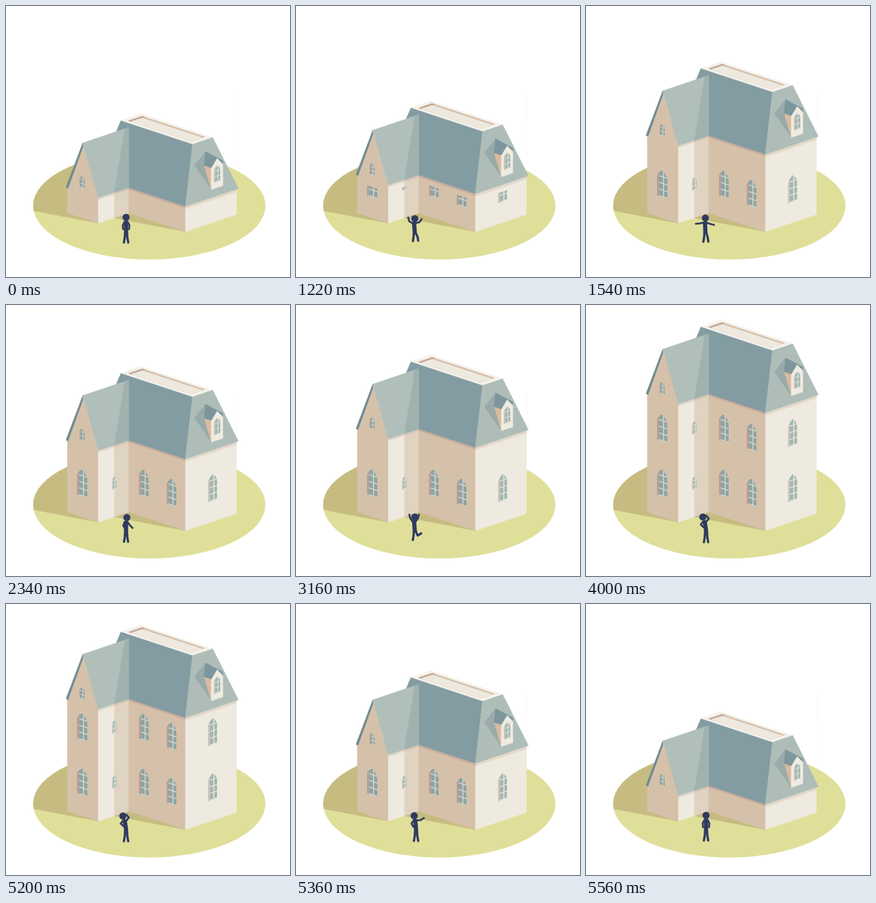
Animation of 440 by 418 pixels, one loop 6 s. Source, as an HTML page with a canvas:

```html
<!DOCTYPE html>
<html lang="en">
<head>
<meta charset="utf-8">
<title>Growing house</title>
<style>
html, body { margin: 0; width: 100%; height: 100%; overflow: hidden; background: #fff; }
canvas { display: block; }
</style>
</head>
<body>
<canvas id="stage" width="440" height="418"></canvas>
<script>
const ctx = document.getElementById('stage').getContext('2d');
const LOOP = 6000, FLOOR = 71.5, GROW = [1060, 3000], SHRINK = 5200;
const FRONT = .327, SIDE = -.335;                 // screen slopes of the two ground axes
const WING = -47, INNER = -88, LEFT = -136, RIGHT = 79;
const EAVE = 39, RIDGE = 116, TOP = 123;

const clamp = u => Math.max(0, Math.min(1, u));
const mix = (a, b, u) => a + (b - a) * u;
const ramp = (t, a, b) => { const u = clamp((t - a) / (b - a)); return u * u * (3 - 2 * u); };
const pulse = (t, a, b, c, d) => ramp(t, a, b) - ramp(t, c, d);
const cubic = u => u < .5 ? 4 * u ** 3 : 1 - 4 * (1 - u) ** 3;

// Shoot up to a peak, then settle on the new floor height.
const rise = (t, from, peak, rest) =>
  mix(mix(from, peak, cubic(clamp(t / 415))), rest, ramp(t, 415, 600));

function roofLift(t) {
  if (t < GROW[1]) return rise(t - GROW[0], 0, 84, FLOOR);
  if (t < SHRINK) return rise(t - GROW[1], FLOOR, 147, 2 * FLOOR);
  const u = clamp((t - SHRINK + 40) / 400);
  return 2 * FLOOR * (1 - ramp(u, 0, 1) - .43 * u * (1 - u) ** 2);
}

// u runs along the front wall, v along the right wall, z up; origin at the near corner.
const project = ([u, v, z]) => [278 + u + v, 348 + FRONT * u + SIDE * v - z];

function trace(points) {
  ctx.beginPath();
  for (const p of points) ctx.lineTo(...p);
}

function fill(color, points) {
  trace(points);
  ctx.closePath();
  ctx.fillStyle = ctx.strokeStyle = color;
  ctx.lineWidth = .5;
  ctx.fill();
  ctx.stroke();
}

const face = (color, ...corners) => fill(color, corners.map(project));
const wall = (color, u0, v0, u1, v1, lo, hi) =>
  face(color, [u0, v0, lo], [u0, v0, hi], [u1, v1, hi], [u1, v1, lo]);
const level = (color, u0, u1, v0, v1, z) =>
  face(color, [u0, v0, z], [u0, v1, z], [u1, v1, z], [u1, v0, z]);

const shaded = { slope: FRONT, bar: '#d4d2c6', glass: '#8da4a4', recess: '#ba9f92' };
const sunny = { slope: SIDE, bar: '#e4e3d8', glass: '#a3b7b2', recess: '#cfc5b8' };

function lancet(at, w, h, look) {
  const l = -w / 2, top = -h / 2, spring = top + h * .28, large = w > 10;
  const bar = large ? 1.7 : 1.2, rows = large ? 4 : 3;
  ctx.save();
  ctx.translate(...project(at));
  ctx.transform(1, look.slope, 0, 1, 0, 0);
  ctx.beginPath();
  ctx.moveTo(l, h / 2);
  ctx.lineTo(l, spring);
  ctx.quadraticCurveTo(l * .8, top + h * .1, 0, top);
  ctx.quadraticCurveTo(-l * .8, top + h * .1, -l, spring);
  ctx.lineTo(-l, h / 2);
  ctx.clip();
  ctx.fillStyle = look.glass;
  ctx.fillRect(l, top, w, h);
  ctx.fillStyle = look.recess;
  ctx.fillRect(l, top, w * .2, h);
  ctx.fillStyle = look.bar;
  ctx.fillRect(w * .08, top, bar, h);
  for (let i = 1; i <= rows; i++) ctx.fillRect(l + w * .2, top + h * i / rows - bar, w, bar);
  ctx.restore();
}

function ground() {
  fill('#fafafa', [[357, 136], [358, 136], [358, 300], [357, 300]]);
  ctx.save();
  ctx.beginPath();
  ctx.ellipse(222, 308.2, 180, 82.8, 0, 0, 7);
  ctx.fillStyle = '#dfdf9a';
  ctx.fill();
  ctx.clip();
  // The sun throws each near corner's shadow to the left.
  for (const corner of [[0, 0, 0], [INNER, WING, 0]]) {
    const [x, y] = project(corner);
    fill('#c6bc81', [[x, y], [x - 110, y - 21], [x - 110, 200], [x, 200]]);
  }
  ctx.restore();
}

function walls(h) {
  const hi = EAVE + 2 + h, mid = (LEFT + INNER) / 2;
  face('#d5c1a9', [LEFT, WING, 0], [LEFT, WING, hi], [mid, WING, RIDGE + h],
       [INNER, WING, hi], [INNER, WING, 0]);
  wall('#eeeadf', INNER, WING, INNER, -22, 0, hi);
  wall('#e1d3c1', INNER, -22, INNER, 0, 0, hi);
  wall('#d5c1a9', INNER, 0, 0, 0, 0, hi);
  wall('#eeeadf', 0, 0, 0, RIGHT, 0, hi);
}

function windows(h) {
  const path = [[LEFT, WING], [INNER, WING], [INNER, 0], [0, 0], [0, RIGHT]];
  const edge = z => path.map(p => project([...p, z]));
  ctx.save();
  trace([...edge(28 + h), ...edge(0).reverse()]);
  ctx.clip();
  for (const z of [52.5, 137.5]) {
    lancet([-113, WING, z], 16, 41, shaded);
    for (const u of [-64.5, -21.5]) lancet([u, 0, z], 15, 41, shaded);
    lancet([0, 42, z], 14, 41, sunny);
    lancet([INNER, -22, z], 7, 20, sunny);
  }
  ctx.restore();
}

function mainRoof() {
  wall('#e2d8ca', INNER, WING, INNER, -22, EAVE - 3, EAVE + 1);
  wall('#d6c6b3', INNER, -22, INNER, 0, EAVE - 3, EAVE + 1);
  wall('#cbae9d', INNER, 0, 0, 0, EAVE - 3, EAVE + 1);
  wall('#e2d8ca', 0, 0, 0, RIGHT, EAVE - 4, EAVE + 1);
  face('#839ca2', [-124, 24, TOP], [-13, 24, TOP], [0, 0, EAVE], [-137, 0, EAVE]);
  face('#afbdb8', [-13, 24, TOP], [-13, 55, TOP], [0, 82, EAVE], [0, 0, EAVE]);
  level('#f5f2eb', -124, -13, 24, 55, TOP);
  level('#d3bfa8', -117, -20, 29, 50, TOP);
  level('#c1a596', -117, -113, 29, 50, TOP);
  level('#eee9de', -113, -20, 29, 46, TOP);
}

function wingRoof() {
  const apex = [-112, WING, RIDGE], end = [-112, 24, RIDGE], valley = [INNER, 0, EAVE];
  face('#718b92', apex, [-138, WING, EAVE], [-135, WING, EAVE - 1], [-112, WING, RIDGE - 7]);
  face('#b0bfba', apex, end, valley, [INNER, WING, EAVE]);
  face('#a0b2af', [-112, 18, RIDGE], end, valley, [INNER, -22, EAVE]);
  lancet([-113, WING, 55.5], 8, 18, shaded);
}

function dormer() {
  const back = [-18, 49, 101], peak = [0, 49, 97], foot = [0, 40, 51.5];
  const near = [0, 40, 85], far = [0, 58, 85], side = [-11, 40, 85];
  face('#98abaa', back, [-34, 48, 75], foot);
  face('#d9bb9f', side, near, foot);
  face('#efebe1', foot, near, peak, far, [0, 58, 51.5]);
  face('#7d969d', back, peak, near, side);
  face('#7d969d', back, [0, 58, 90], far, peak);
  lancet([0, 49, 73], 10, 25, sunny);
}

// Angles in degrees from straight down, positive to the right: upper and lower part per limb.
const stand = { x: 186, y: 333, hip: 0, head: 0, leg: 1,
  armL: -27, foreL: 6, armR: 27, foreR: -6, thighL: -3, shinL: -10, thighR: 3, shinR: 10 };
const crouch = { y: 336, head: 2, leg: .85, armL: -13, foreL: 50, armR: 40, foreR: 75 };
const push = { x: 183, y: 335, hip: 1, head: 1, leg: .75,
  armL: -120, foreL: -165, armR: 105, foreR: 145, thighR: 25 };
const jump = { ...push, y: 334, armL: -145, armR: 145, foreR: 165, leg: .8, shinR: 120 };
const ponder = { x: 184, y: 334, hip: 2, head: -3, armL: -40, foreL: 45, armR: 140, foreR: 220 };

function poseAt(t) {
  const pose = { ...stand };
  const blend = (move, w) => {
    for (const k in move) pose[k] += w * (move[k] - stand[k]);
  };
  GROW.forEach((go, i) => {
    const ready = [300, 2140][i];
    blend(crouch, pulse(t, ready - 20, ready + 360, go, go + 160));
    blend([push, jump][i], pulse(t, go, go + 160, go + 320, go + 660));
  });
  blend(ponder, pulse(t, 3640, 4000, SHRINK, SHRINK + 360));
  return pose;
}

function limb(x, y, upper, lower, l1, l2, width) {
  const step = ([px, py], deg, l) =>
    [px + l * Math.sin(deg * Math.PI / 180), py + l * Math.cos(deg * Math.PI / 180)];
  const joint = step([x, y], upper, l1);
  trace([[x, y], joint, step(joint, lower, l2)]);
  ctx.lineWidth = width;
  ctx.stroke();
}

function figure(t) {
  const p = poseAt(t), hipX = p.x + p.hip, hipY = p.y + 15;
  ctx.strokeStyle = ctx.fillStyle = '#2f3a60';
  ctx.lineCap = ctx.lineJoin = 'round';
  trace([[p.x, p.y + 1], [hipX, hipY - 1]]);
  ctx.lineWidth = 6.5;
  ctx.stroke();
  for (const [s, k] of [[-1, 'L'], [1, 'R']]) {
    limb(p.x + 2.5 * s, p.y, p['arm' + k], p['fore' + k], 6, 6, 2.8);
    limb(hipX + 1.5 * s, hipY, p['thigh' + k], p['shin' + k], 9 * p.leg, 8 * p.leg, 3.5);
  }
  ctx.beginPath();
  ctx.arc(p.x + p.head, p.y - 7, 5.5, 0, 7);
  ctx.fill();
}

function draw(t) {
  const h = roofLift(t);
  ctx.clearRect(0, 0, 440, 418);
  ground();
  walls(h);
  windows(h);
  ctx.save();
  ctx.translate(0, -h);
  mainRoof();
  wingRoof();
  dormer();
  ctx.restore();
  figure(t);
}

const start = performance.now();
function tick() {
  draw((performance.now() - start) % LOOP);
  requestAnimationFrame(tick);
}
tick();
</script>
</body>
</html>
```
